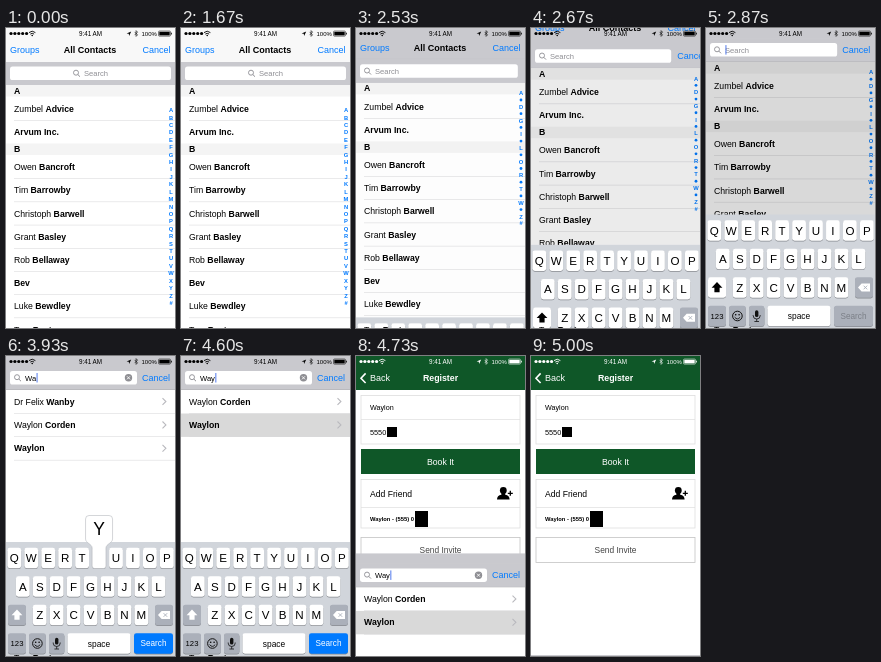
Write an HTML page that moves like this. It is 169x300 px and loops after 5.07 s.

```html
<!DOCTYPE html>
<html lang="en">
<head>
<meta charset="utf-8">
<title>Contact picker</title>
<style>
  html, body { margin: 0; width: 100%; height: 100%; overflow: hidden; background: #fff; }
  svg { display: block; width: 100vw; height: 100vh; }
  text { font-family: "Liberation Sans", Arial, sans-serif; white-space: pre; }
</style>
</head>
<body>
<svg id="stage" viewBox="0 0 169 300" preserveAspectRatio="none"></svg>
<script>
const LOOP = 5070, FRAME = 1000 / 15;
const BLUE = '#007aff', GREEN = '#0f5728', BAR = '#c9c9ce', GRAY = '#8e8e93', LINE = '#d4d4d7';

// Markup helpers; text is placed by the middle of its capitals.
const text = (x, y, str, size, { fill = '#000', bold, anchor = 'start', id } = {}) =>
  `<text ${id ? `id="${id}"` : ''} x="${x}" y="${y + size * 0.36}" font-size="${size}" fill="${fill}"
    text-anchor="${anchor}" ${bold ? 'font-weight="700"' : ''}>${str}</text>`;
const rect = (x, y, w, h, fill, extra = '') =>
  `<rect x="${x}" y="${y}" width="${w}" height="${h}" fill="${fill}" ${extra}/>`;
const stroke = (d, color, width, extra = '') =>
  `<path d="${d}" fill="none" stroke="${color}" stroke-width="${width}" ${extra}/>`;
const group = (id, body, extra = '') => `<g id="${id}" ${extra}>${body}</g>`;
const rule = (y, x = 8) => rect(x, y, 169 - x, 0.5, LINE);
const boldLast = name => name.replace(/(\S+)$/, '<tspan font-weight="700">$1</tspan>');

function contactList() {
  const header = (y, letter) =>
    rect(0, y - 5.5, 169, 11.5, '#f4f4f4') + text(8, y, letter, 8.7, { bold: true });
  const row = (y, name) => text(8, y, boldLast(name), 8.7) + rule(y + 11.4);
  const people = ['Owen Bancroft', 'Tim Barrowby', 'Christoph Barwell', 'Grant Basley',
    'Rob Bellaway', 'Bev', 'Luke Bewdley', 'Tom Bexton'];
  return rect(0, 57, 169, 300, '#fff') + header(62.5, 'A') + row(81, 'Zumbel Advice') +
    text(8, 104, 'Arvum Inc.', 8.7, { bold: true }) + header(121, 'B') +
    people.map((name, i) => row(139 + i * 23.2, name)).join('');
}

function indexStrip(labels, top, step) {
  return [...labels].map((c, i) => c === '.'
    ? `<circle cx="165" cy="${top + i * step}" r="1.4" fill="${BLUE}"/>`
    : text(165, top + i * step, c, 5.8, { fill: BLUE, bold: true, anchor: 'middle' })).join('');
}

function results(id, names, picked) {
  const rows = names.map((name, i) => {
    const y = 45.5 + i * 23.4;
    return (i === picked ? group('highlight', rect(0, y - 11.4, 169, 23.4, '#d9d9d9')) : '') +
      text(8, y, boldLast(name), 8.7) +
      stroke(`M156.5 ${y - 3.4}l3.4 3.4l-3.4 3.4`, '#b9b9be', 1.1) + rule(y + 11.6);
  });
  return group(id, rect(0, 34, 169, 266, '#fff') + rows.join(''));
}

const PITCH = 16.95, KEY_H = 20.4;
const ROWS = [['QWERTYUIOP', 8.3, 202], ['ASDFGHJKL', 16.8, 230.5], ['ZXCVBNM', 33.7, 259]];

const key = (x, y, w, fill = '#fff') =>
  rect(x, y - KEY_H / 2 + 0.7, w, KEY_H, '#888b91', 'rx="2.4"') +
  rect(x, y - KEY_H / 2, w, KEY_H, fill, 'rx="2.4"');

function popup(letter) {
  const [chars, left, y] = ROWS.find(r => r[0].includes(letter));
  const x = left + chars.indexOf(letter) * PITCH, dy = y - 202;
  return group('pop' + letter,
    `<path d="M${x - 10} ${159.5 + dy}h20q3.5 0 3.5 3.5v20c0 4-6.6 5-6.6 9v18q0 2.5-2.5 2.5h-8.8q-2.5 0-2.5-2.5v-18c0-4-6.6-5-6.6-9v-20q0-3.5 3.5-3.5z"
      fill="#fff" stroke="#a9acb2" stroke-width=".5"/>` +
    text(x, 172.5 + dy, letter, 17.5, { anchor: 'middle' }));
}

function keyboard() {
  const dark = '#abb0ba', mid = { anchor: 'middle' };
  const letters = ROWS.map(([chars, left, y]) => [...chars].map((c, i) => {
    const x = left + i * PITCH;
    return key(x - 6.9, y, 13.8) + text(x, y, c, 11.6, mid);
  }).join('')).join('');
  const arrow = fill => `<path d="M11 253.6l5.4 5.6h-2.8v4.6h-5.2v-4.6h-2.8z" fill="${fill}"/>`;
  const face = `<circle cx="31.4" cy="287.5" r="4.8" fill="none" stroke="#111" stroke-width="1"/>
    <circle cx="29.7" cy="286.2" r=".8"/><circle cx="33.1" cy="286.2" r=".8"/>` +
    stroke('M28.6 288.6q2.8 3.6 5.6 0', '#111', 0.9);
  const mic = rect(49, 281.8, 3.4, 6.8, '#111', 'rx="1.7"') +
    stroke('M47.2 286.5v.6q0 3.4 3.5 3.4t3.5-3.4v-.6M50.7 290.5v2.4M48.4 293h4.6', '#111', 0.8);
  return rect(0, 186, 169, 114, '#d1d5db') + letters +
    group('shiftOn', key(2, 259, 18) + arrow('#000')) +
    group('shiftOff', key(2, 259, 18, dark) + arrow('#fff')) +
    key(149, 259, 18, dark) +
    '<path d="M152 259l3.6-4h8.4v8h-8.4z" fill="#fff"/>' +
    stroke('M157.6 257.2l3.6 3.6m0-3.6l-3.6 3.6', dark, 0.9) +
    key(2, 287.5, 18, dark) + text(11, 287.5, '123', 7.7, mid) +
    key(23, 287.5, 16.8, dark) + face + key(43, 287.5, 15.4, dark) + mic +
    key(61.5, 287.5, 63, '#fff') + text(93, 287.5, 'space', 8.4, mid) +
    group('goOff', key(128, 287.5, 39, dark) + text(147.5, 287.5, 'Search', 8.2, { ...mid, fill: '#7b7f87' })) +
    group('goOn', key(128, 287.5, 39, BLUE) + text(147.5, 287.5, 'Search', 8.2, { ...mid, fill: '#fff' })) +
    popup('W') + popup('A') + popup('Y');
}

function searchBar() {
  const glass = `<circle cx="0" cy="-.6" r="2.5" fill="none" stroke="${GRAY}" stroke-width=".9"/>` +
    stroke('M1.8 1.2l2.2 2.2', GRAY, 1);
  return rect(0, 34, 169, 23, BAR) +
    rect(4, 38.5, 161, 13.5, '#fff', 'id="field" rx="2.6"') +
    group('hint', `<g transform="translate(70 45.3)">${glass}</g>` +
      group('placeholder', text(78, 45.3, 'Search', 7.6, { fill: GRAY }))) +
    text(19, 45.3, '', 7.6, { id: 'query' }) +
    rect(19.5, 40.5, 0.9, 9.5, '#3f6bea', 'id="cursor"') +
    group('clear', `<circle cx="122.5" cy="45.3" r="3.7" fill="${GRAY}"/>` +
      stroke('M121 43.8l3 3m0-3l-3 3', '#fff', 0.9)) +
    text(136, 45, 'Cancel', 9, { fill: BLUE, id: 'cancel' });
}

function register() {
  const mid = { anchor: 'middle' };
  const box = (y, h, color = '#dedede') => rect(5, y, 159, h, '#fff', `stroke="${color}" stroke-width=".8"`);
  const friend = `<circle cx="147.3" cy="134.4" r="3.4"/>
    <path d="M141 143.6q0-4 4.4-4.8v-2h3.8v2q4.4.8 4.4 4.8z"/>` +
    stroke('M154.3 134.8v5M151.8 137.3h5', '#000', 1.3);
  return rect(0, 0, 169, 300, '#fff') + rect(0, 0, 169, 34, GREEN) +
    stroke('M9.6 17.4l-4.6 4.8l4.6 4.8', '#fff', 1.6) +
    text(14, 22.2, 'Back', 9, { fill: '#fff' }) +
    text(84.5, 22.2, 'Register', 8.8, { ...mid, fill: '#fff', bold: true }) +
    box(39.5, 48.5) + rect(5, 63.3, 159, 0.7, '#dedede') +
    text(14, 51.3, 'Waylon', 7.2) + text(14, 76, '5550', 7.3) + rect(31, 71, 10, 10, '#000') +
    rect(5, 93, 159, 25, GREEN) + text(84.5, 105.7, 'Book It', 8.7, { ...mid, fill: '#fff' }) +
    box(123.5, 48.5) + rect(5, 151, 159, 0.7, '#dedede') +
    text(14, 137.7, 'Add Friend', 8.6) + friend +
    text(14, 163, 'Waylon - (555) 0', 5.8, { bold: true }) + rect(59, 155, 13, 16, '#000') +
    box(181.5, 25, '#c4c4c4') + text(84.5, 194.3, 'Send Invite', 8.4, { ...mid, fill: '#444' });
}

function statusBar() {
  const dots = [0, 1, 2, 3, 4].map(i => `<circle cx="${5 + i * 3.9}" cy="5.5" r="1.6"/>`).join('');
  const ink = 'currentColor';
  return dots +
    stroke('M23 4.6q3.2-2.8 6.4 0M24.3 6.1q1.9-1.6 3.8 0', ink, 0.9) + '<circle cx="26.2" cy="7.5" r=".8"/>' +
    text(84.5, 5.6, '9:41 AM', 6.3, { fill: ink, anchor: 'middle' }) +
    '<path d="M120.6 5.6l4.6-2.2l-2.1 4.7l-.3-2.3z"/>' +
    stroke('M128.6 3.9l3 3l-1.5 1.5v-5.8l1.5 1.5l-3 3', ink, 0.6) +
    text(135.5, 5.6, '100%', 6, { fill: ink }) +
    rect(152.5, 3, 12, 5.2, 'none', `rx="1" stroke="${ink}" stroke-width=".5"`) +
    rect(153.3, 3.8, 10.4, 3.6, ink) + rect(165.2, 4.7, 0.8, 1.8, ink);
}

const stage = document.getElementById('stage');
stage.innerHTML = register() + group('picker',
  rect(0, 0, 169, 300, BAR) +
  group('list', contactList() +
    group('fullIndex', indexStrip('ABCDEFGHIJKLMNOPQRSTUVWXYZ#', 82, 7.42)) +
    group('shortIndex', indexStrip('A.D.G.I.L.O.R.T.W.Z#', 67.3, 6.85))) +
  rect(0, 30, 169, 270, '#000', 'id="dim"') +
  results('wide', ['Dr Felix Wanby', 'Waylon Corden', 'Waylon']) +
  results('narrow', ['Waylon Corden', 'Waylon'], 1) +
  rect(0, 0, 169, 34, '#f8f8f8', 'id="navBack"') +
  group('searchBar', searchBar()) +
  group('nav', text(4, 22.2, 'Groups', 9, { fill: BLUE }) +
    text(84, 22.2, 'All Contacts', 9, { bold: true, anchor: 'middle' }) +
    text(164.5, 22.2, 'Cancel', 9, { fill: BLUE, anchor: 'end' })) +
  group('keyboard', keyboard()) +
  group('lastRow', text(8, 301.4, boldLast('Tom Bexton'), 8.7))) +
  group('status', statusBar(), 'fill="currentColor"');

const el = {};
stage.querySelectorAll('[id]').forEach(node => el[node.id] = node);
const show = (id, on) => el[id].setAttribute('display', on ? 'inline' : 'none');
const move = (id, x, y) => el[id].setAttribute('transform', `translate(${x} ${y})`);
const progress = (t, from, to) => Math.min(1, Math.max(0, (t - from) / (to - from)));
const easeOut = p => 1 - (1 - p) ** 3;

function render(t) {
  const between = (from, to) => t >= from && t < to;
  const searching = t >= 2520;
  const open = easeOut(progress(t, 2520, 2935));
  const query = t < 3460 ? '' : t < 3730 ? 'W' : t < 3995 ? 'Wa' : 'Way';
  const typed = query !== '';

  move('list', 0, -23 * open);
  move('searchBar', 0, -23.5 * open);
  move('nav', 0, -31 * open);
  show('nav', open < 1);
  show('navBack', !searching);
  show('fullIndex', !searching);
  show('shortIndex', searching);
  el.dim.setAttribute('opacity', 0.15 * progress(t, 2520, 2800));

  el.field.setAttribute('width', 161 - 34 * open);
  move('hint', searching ? -59 : 0, 0);
  move('cancel', 38 * (1 - open), 0);
  show('cancel', searching);
  show('placeholder', !typed);
  show('clear', typed);
  el.query.textContent = query;
  show('cursor', t >= 2790);
  move('cursor', typed ? el.query.getComputedTextLength() : 0, 0);

  show('wide', typed && query !== 'Way');
  show('narrow', query === 'Way');
  show('highlight', t >= 4460);

  move('keyboard', 0, 114 * (1 - open));
  show('keyboard', searching);
  show('lastRow', searching);
  show('shiftOn', !typed);
  show('shiftOff', typed);
  show('goOff', !typed);
  show('goOn', typed);
  show('popW', between(3330, 3460));
  show('popA', between(3660, 3730));
  show('popY', between(3860, 3995));

  move('picker', 0, 299 * easeOut(progress(t, 4620, 4995)));
  el.status.setAttribute('color', t >= 4660 ? '#fff' : '#000');
}

function tick(now) {
  render(Math.floor((now % LOOP) / FRAME + 0.1) * FRAME);
  requestAnimationFrame(tick);
}
render(0);
requestAnimationFrame(tick);
</script>
</body>
</html>
```
